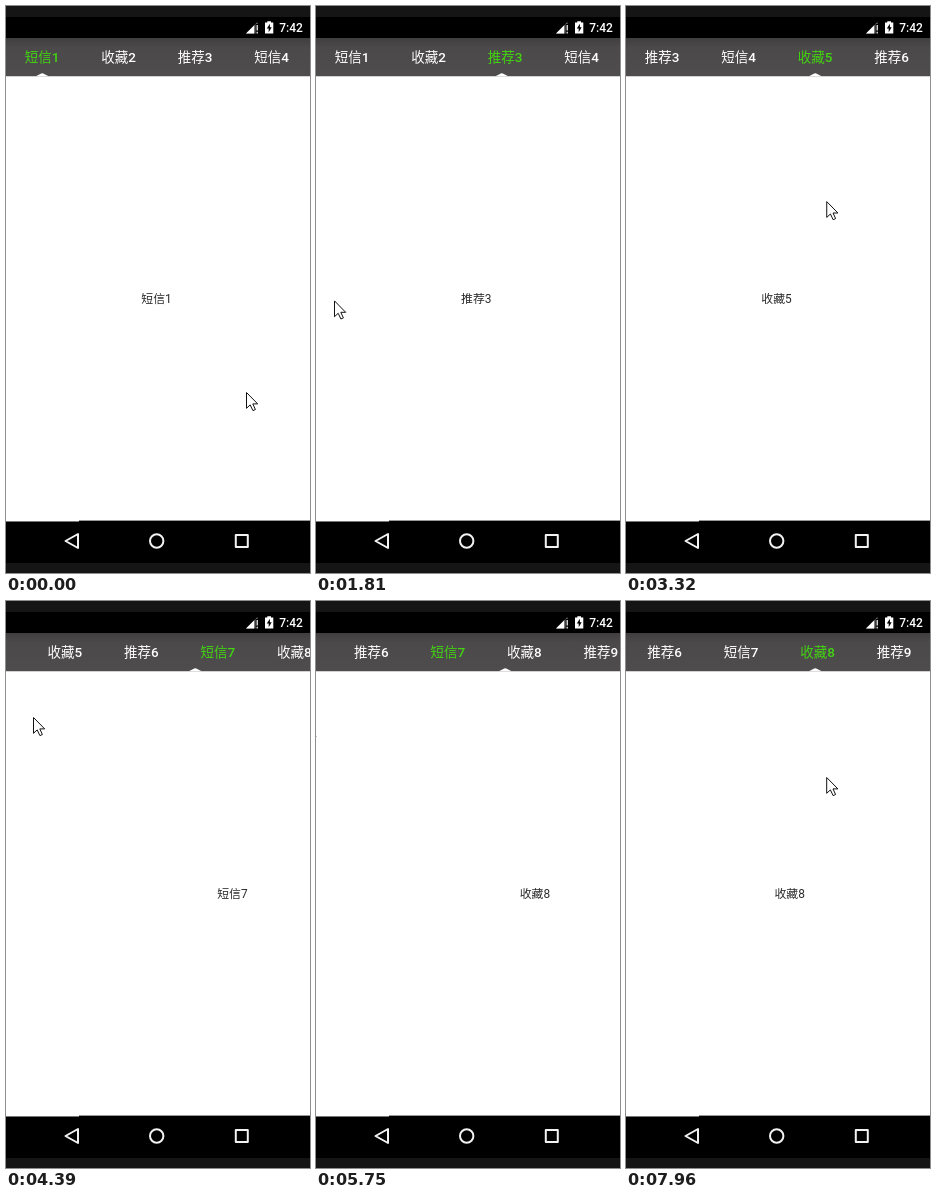
Write an HTML page that moves like this. It is 304 by 567 pixels and loops after 8000 ms.

```html
<!DOCTYPE html>
<html lang="zh-CN">
<head>
<meta charset="utf-8">
<title>Tab pager</title>
<style>
  html, body { margin: 0; width: 100%; height: 100%; overflow: hidden; background: #fff; }
  svg { display: block; width: 304px; height: 567px; overflow: hidden; }
  text { font-family: Roboto, "Noto Sans CJK SC", "Noto Sans CJK", sans-serif; text-anchor: middle; }
  #tabs text { font-size: 13.5px; font-weight: 500; fill: #fff; }
  #tabs text.on { fill: #42d411; }
  #pages text { font-size: 11.9px; fill: #2b2b2b; }
  .clock { font-size: 12px; font-weight: 500; fill: #fff; }
  .nav { fill: none; stroke: #f2f2f2; stroke-width: 2; stroke-linejoin: round; }
</style>
</head>
<body>
<svg viewBox="0 0 304 567">
  <defs>
    <linearGradient id="bar" x2="0" y2="1">
      <stop offset="0" stop-color="#403e3e"/>
      <stop offset=".25" stop-color="#4c494a"/>
      <stop offset="1" stop-color="#4f4c4d"/>
    </linearGradient>
  </defs>
  <rect width="304" height="567" fill="#fff"/>
  <g id="pages"></g>

  <rect width="304" height="11" fill="#151515"/>
  <rect y="11" width="304" height="21" fill="#000"/>
  <rect y="32" width="304" height="38.25" fill="url(#bar)"/>
  <path d="M240 27.5L251.5 16V27.5Z" fill="#777"/>
  <path d="M240 27.5L248 19.5V27.5Z" fill="#fff"/>
  <path d="M249.5 18H253V28H249.5Z" fill="#000"/>
  <path d="M251.2 19V24.5M251.2 25.8V27.4" stroke="#fff" stroke-width="1.2"/>
  <path d="M259 16.5H261.3V15.2H265V16.5H267.3V27.5H259Z" fill="#fff"/>
  <path d="M263.9 17.8L260.8 22.6H262.7V26.2L265.7 21.3H263.9Z" fill="#000"/>
  <text class="clock" x="285" y="26">7:42</text>

  <g id="tabs"></g>
  <path id="marker" d="M-6.4 70.3L-2 67.9Q0 66.8 2 67.9L6.4 70.3Z" fill="#fff"/>

  <rect y="515" width="304" height="42" fill="#000"/>
  <rect x="73" y="514" width="231" height="1" fill="#999"/>
  <rect y="515" width="73" height="1" fill="#777"/>
  <rect y="557" width="304" height="10" fill="#151515"/>
  <path class="nav" d="M59.5 535L72 528V542Z"/>
  <circle class="nav" cx="150.7" cy="535" r="6.7"/>
  <rect class="nav" x="229.8" y="529" width="12" height="12"/>

  <path id="cursor" d="M.5 .5V16.3L4.2 12.9L6.9 18.6L9.4 17.5L6.8 11.9H11.7Z" fill="#fff" stroke="#111"/>
</svg>
<script>
const LOOP = 8000, PAGE = 306, TAB = PAGE / 4, LEFT = -2.5;
const DRAG = 200, SETTLE = 258, TAB_LAG = 15;

// each swipe lasts DRAG ms: release time, pointer x from and to
const swipes = [
  [520, 240, 23], [1680, 242, 18], [2340, 240, 60], [2960, 242, 25], [3580, 242, 25],
  [4375, 241, 27], [5760, 226, -13], [6480, 242, 20], [7190, 207, 266], [8060, 187, 213]
].map(([release, from, to]) => ({ press: release - DRAG, release, from, to }));

// the hand drifts slowly between these heights
const heights = [[140, 386], [1000, 337], [2390, 264], [4390, 116], [6990, 130], [7960, 176]];

const smooth = u => u * u * (3 - 2 * u);
const easeOut = u => 1 - (1 - u) ** 3;
const mix = (a, b, u) => a + (b - a) * u;
const span = (t, start, end) => Math.min(1, Math.max(0, (t - start) / (end - start)));
const $ = id => document.getElementById(id);

const dragX = (s, t) => mix(s.from, s.to, smooth(span(t, s.press, s.release)));

// rests after a swipe, then travels to the next one in the second half of the gap
function pointerX(t) {
  const i = swipes.findIndex(s => t < s.release);
  const next = swipes[i], last = swipes[i - 1];
  if (!last || t >= next.press) return dragX(next, t);
  const leave = (last.release + next.press) / 2;
  return mix(last.to, next.from, smooth(span(t, leave, next.press)));
}

function pointerY(t) {
  return heights.slice(1).reduce((y, [time, height], i) =>
    mix(y, height, span(t, heights[i][0], time)), heights[0][1]);
}

function pagerAt(t) {
  let page = 0, selected = 0;
  for (const s of swipes) {
    if (t < s.press) break;
    page = selected + (s.from - dragX(s, t)) / PAGE;
    if (t < s.release) break;
    selected += Math.sign(s.from - s.to);
    page = mix(page, selected, easeOut(span(t, s.release, s.release + SETTLE)));
  }
  return { page, selected };
}

function addText(parent, label, x, y) {
  const node = document.createElementNS(parent.namespaceURI, 'text');
  node.setAttribute('x', x);
  node.setAttribute('y', y);
  node.textContent = label;
  parent.append(node);
  return node;
}

const tabs = Array.from({ length: 9 }, (_, i) => {
  const label = ['短信', '收藏', '推荐'][i % 3] + (i + 1);
  addText($('pages'), label, LEFT + PAGE * (i + .5), 297);
  return addText($('tabs'), label, LEFT + TAB * (i + .5) + .4, 56.4);
});

const move = (id, x, y = 0) => $(id).setAttribute('transform', `translate(${x} ${y})`);

function draw(t) {
  const { page, selected } = pagerAt(t);
  const tabPage = pagerAt(t - TAB_LAG).page;
  move('pages', -PAGE * page);
  move('tabs', -TAB * Math.max(0, tabPage - 2));
  move('marker', LEFT + TAB * (Math.min(2, tabPage) + .5) + .5);
  move('cursor', pointerX(t), pointerY(t));
  tabs.forEach((tab, i) => tab.classList.toggle('on', i === selected));
}

function tick(now) {
  draw(now % LOOP);
  requestAnimationFrame(tick);
}
draw(0);
requestAnimationFrame(tick);
</script>
</body>
</html>
```
